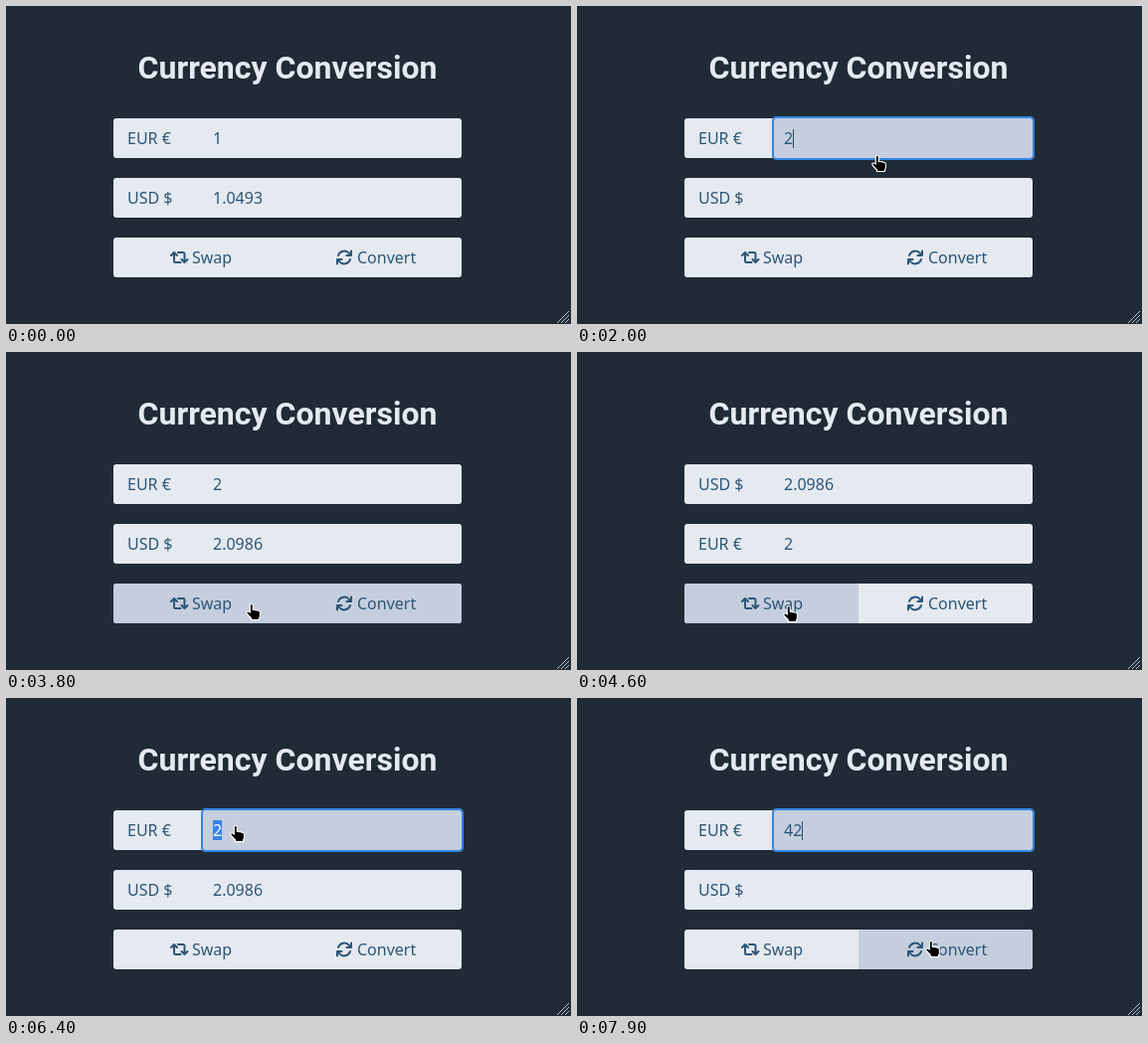
An HTML page for the animation above (8 s loop, 568 by 320 pixels).

```html
<!DOCTYPE html>
<html lang="en">
<head>
<meta charset="utf-8">
<title>Currency Conversion</title>
<style>
  html, body { margin: 0; width: 100%; height: 100%; overflow: hidden; background: #202b36; }
  svg { display: block; width: 568px; height: 320px; }
  text { font: 500 16px "Noto Sans", sans-serif; fill: #2c5676; white-space: pre; }
  .title { font: 700 32px Roboto, sans-serif; fill: #e5e9f0; text-anchor: middle; }
  .panel { fill: #e5e9f0; }
  .icon { fill: none; stroke: #2c5676; stroke-width: 2; stroke-linecap: round; stroke-linejoin: round; }
  .cursor path { fill: #000; stroke: #fff; stroke-width: 1.1; stroke-linejoin: round; }
  .grip { stroke: #b9bec3; stroke-width: 1; }
</style>
</head>
<body>
<svg viewBox="0 0 568 320">
  <rect width="568" height="320" fill="#202b36"/>
  <text class="title" x="283" y="73">Currency Conversion</text>

  <rect class="panel" x="108" y="113" width="350" height="40" rx="3"/>
  <rect class="panel" x="108" y="173" width="350" height="40" rx="3"/>
  <rect class="panel" x="108" y="233" width="350" height="40" rx="3"/>

  <path id="top" d="M198 113h257a3 3 0 0 1 3 3v34a3 3 0 0 1-3 3h-257z"/>
  <path id="bottom" d="M198 173h257a3 3 0 0 1 3 3v34a3 3 0 0 1-3 3h-257z"/>
  <path id="swap" d="M283 233v40h-172a3 3 0 0 1-3-3v-34a3 3 0 0 1 3-3z"/>
  <path id="convert" d="M283 233h172a3 3 0 0 1 3 3v34a3 3 0 0 1-3 3h-172z"/>
  <rect id="ring" x="197" y="112" width="262" height="42" rx="3.5" fill="none" stroke="#3584e4" stroke-width="2"/>
  <rect id="mark" x="208" y="123" width="9" height="20" fill="#3584e4"/>

  <text id="from" x="122" y="139"></text>
  <text id="amount" x="208" y="139"></text>
  <text id="to" x="122" y="199"></text>
  <text id="result" x="208" y="199"></text>
  <rect id="caret" y="124" width="1" height="19" fill="#2c4560"/>

  <path class="icon" d="M169 248v8.500a1.500 1.500 0 0 0 1.500 1.500h5M166 251l3-3 3 3M173 248h5a1.500 1.500 0 0 1 1.500 1.500v8.500M176.500 255l3 3 3-3"/>
  <text x="187" y="259">Swap</text>
  <path class="icon" d="M334 251a6.300 6.300 0 0 1 11-2l1.500 1.700M347 246.500v4.500h-4.500M346 255a6.300 6.300 0 0 1-11 2l-1.500-1.700M333 259.500v-4.500h4.500"/>
  <text x="353" y="259">Convert</text>

  <path class="grip" d="M554 319l12-12M558 319l8-8M562 319l4-4"/>

  <g id="hand" class="cursor">
    <path d="M-1.700 1.200q0-1.700 1.500-1.700t1.500 1.700v4.300q1.400-.7 2.300.3 1.500-.6 2.300.5 2.400-.3 2.500 1.900v3.300q0 1.500-1 2.500v1.500h-7.900v-1.500l-3.300-3.500q-2.300-2.400-1-3.300 1.400-.8 3.100 1z"/>
  </g>
  <g id="arrow" class="cursor">
    <path d="M0 0v14.500l3.400-3.200 2.200 5.200 2.300-1-2.200-5h4.600z"/>
  </g>
</svg>
<script>
const LOOP = 8000, TICK = 100;
const FILL = { hover: "#c5cede", active: "#b4c1d6" };
const $ = id => document.getElementById(id);

// [ms, changes], each adding to the state before it
const steps = [
  [0, { from: "EUR €", to: "USD $", amount: "1", result: "1.0493", focus: "", press: "", marked: false }],
  [1000, { focus: "top", press: "top" }],
  [1100, { press: "", marked: true }],
  [1600, { amount: "2", result: "", marked: false }],
  [3000, { focus: "convert", press: "convert" }],
  [3100, { press: "" }],
  [3200, { result: "2.0986" }],
  [4400, { focus: "swap", press: "swap" }],
  [4600, { press: "", from: "USD $", to: "EUR €", amount: "2.0986", result: "2" }],
  [5400, { press: "swap" }],
  [5600, { press: "", from: "EUR €", to: "USD $", amount: "2", result: "2.0986" }],
  [6200, { focus: "top", press: "top" }],
  [6400, { press: "", marked: true }],
  [7200, { amount: "4", result: "", marked: false }],
  [7400, { amount: "42" }]
];

// Pointer way points: [ms, x, y]
const route = [
  [300, 26, 4], [800, 291, 124], [1700, 291, 124], [2000, 302, 151], [2500, 348, 248],
  [3500, 348, 248], [3900, 213, 256], [5600, 213, 256], [6100, 231, 129],
  [7400, 231, 129], [7900, 356, 245]
];

const zones = {
  top: [198, 113, 458, 153],
  bottom: [198, 173, 458, 213],
  swap: [108, 233, 283, 273],
  convert: [283, 233, 458, 273]
};

function pointerAt(t) {
  if (t < route[0][0]) return null;
  const next = route.findIndex(p => p[0] > t);
  if (next < 0) return route.at(-1).slice(1);
  const [t0, x0, y0] = route[next - 1], [t1, x1, y1] = route[next];
  const k = (t - t0) / (t1 - t0);
  return [Math.round(x0 + (x1 - x0) * k), Math.round(y0 + (y1 - y0) * k)];
}

function zoneAt([x, y]) {
  return Object.keys(zones).find(id => {
    const [l, t, r, b] = zones[id];
    return x >= l && x < r && y >= t && y < b;
  });
}

const show = (id, on) => $(id).setAttribute("visibility", on ? "visible" : "hidden");

function render(t) {
  const s = Object.assign({}, ...steps.filter(e => e[0] <= t).map(e => e[1]));
  const pos = pointerAt(t);
  const over = pos && zoneAt(pos);

  for (const id of ["from", "to", "amount", "result"]) $(id).textContent = s[id];
  for (const id in zones) {
    const fill = s.press === id ? FILL.active : over === id || s.focus === id ? FILL.hover : "none";
    $(id).setAttribute("fill", fill);
  }

  const editing = s.focus === "top";
  show("ring", editing);
  show("mark", s.marked);
  show("caret", editing && !s.marked);
  $("amount").style.fill = s.marked ? "#fff" : "";
  $("caret").setAttribute("x", Math.round(208 + $("amount").getComputedTextLength()));

  show("hand", pos && over);
  show("arrow", pos && !over);
  if (pos) $(over ? "hand" : "arrow").setAttribute("transform", `translate(${pos})`);
}

let last = -1;
const start = performance.now();
function frame() {
  const t = Math.floor((performance.now() - start) % LOOP / TICK) * TICK;
  if (t !== last) render(last = t);
  requestAnimationFrame(frame);
}
render(0);
requestAnimationFrame(frame);
</script>
</body>
</html>
```
